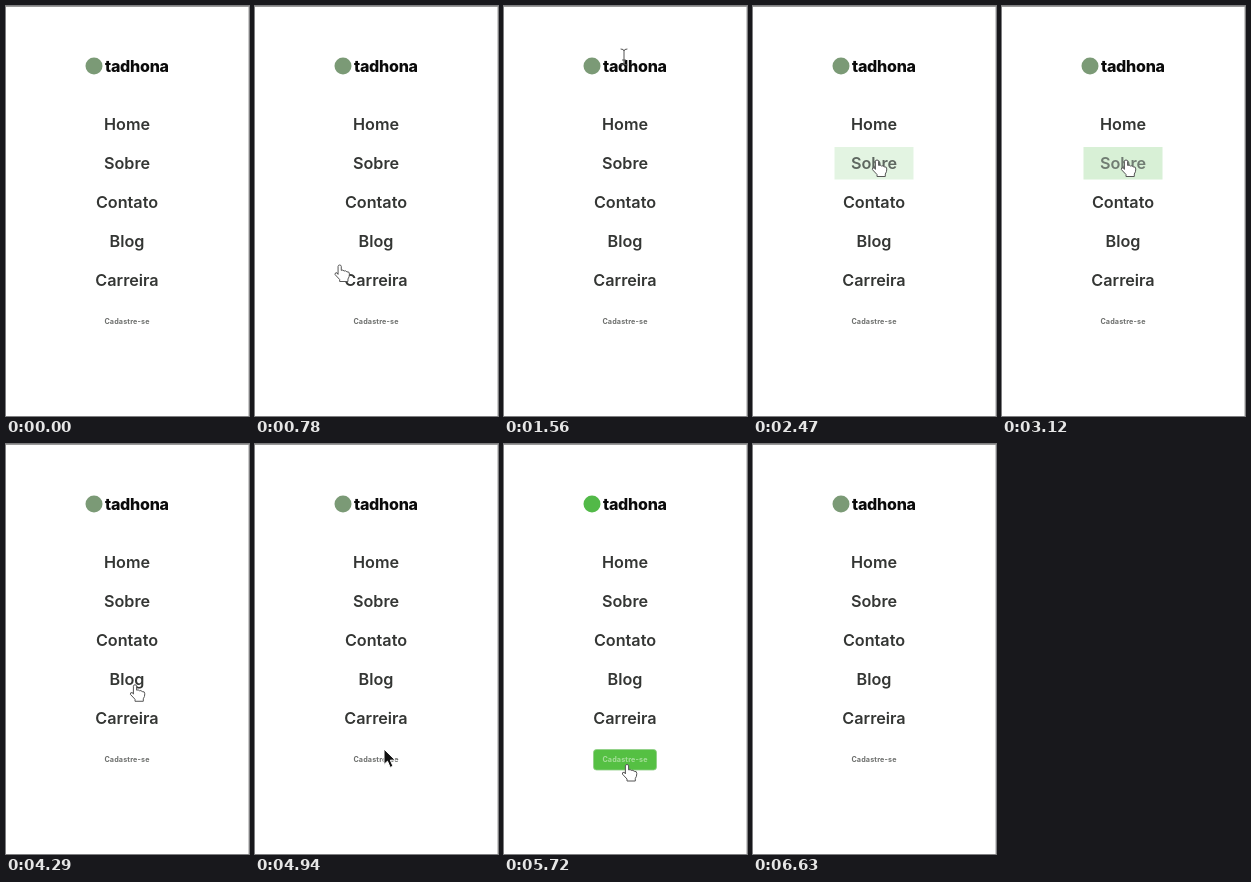
Write an HTML page that moves like this. It is 243 by 410 pixels and loops after 6.89 s.

```html
<!DOCTYPE html>
<html lang="pt">
<head>
<meta charset="utf-8">
<title>Menu</title>
<style>
  html, body { margin: 0; width: 100%; height: 100%; overflow: hidden; background: #fff; }
  svg { display: block; width: 243px; height: 410px; font-family: Inter, "Open Sans", sans-serif; }
  .soft { filter: blur(.35px); }
  .brand { font-size: 16px; font-weight: 800; letter-spacing: -.25px; fill: #0b0b0b; }
  .links { font-size: 16.2px; font-weight: 600; text-anchor: middle; fill: #343634; }
  .signup { font-size: 7.2px; font-weight: 700; letter-spacing: .15px; text-anchor: middle; }
</style>
</head>
<body>
<svg viewBox="0 0 243 410">
  <rect width="243" height="410" fill="#fff"/>
  <path d="M242.5 0V410" stroke="#ccc"/>
  <path d="M0 .5H243" stroke="#999"/>
  <g class="soft">
    <circle id="logo" cx="88" cy="60" r="8.5"/>
    <text class="brand" x="99" y="66">tadhona</text>
    <rect id="hover" x="81.5" y="141" width="79" height="32.5" fill="#d8f0d6"/>
    <g id="links" class="links"></g>
    <rect id="button" x="89.5" y="305.5" width="63" height="20.5" rx="3" fill="#55c043" stroke="#8fcf84" stroke-width=".8"/>
    <text id="signup" class="signup" x="121" y="318">Cadastre-se</text>
    <g id="cursor" stroke-linejoin="round" stroke-linecap="round">
      <path id="arrow" d="M0 0V15L3.5 11.8L6.2 18L9 16.8L6.3 10.8H11Z" fill="#111" stroke="#fff"/>
      <path id="beam" d="M-3 -8Q0 -8 0 -6Q0 -8 3 -8M0 -6V6M-3 8Q0 8 0 6Q0 8 3 8M-1.5 3H1.5" fill="none" stroke="#555"/>
      <path id="hand" d="M-1.6 9V1.4Q-1.5 0 0 0T1.6 1.4V5.4Q3.2 4.5 4.5 6Q6 5.2 7.2 6.8Q9.8 6.3 9.8 9Q9.8 12 8.3 14V16.5H0V14.5L-4.6 9.6Q-5 7.4 -3 7.7Z" fill="#fff" stroke="#555"/>
    </g>
  </g>
</svg>
<script>
const LOOP = 6890, STEP = 130, ENTER = 520;
const FIRST = 118, GAP = 39; // link centres
const $ = id => document.getElementById(id);

const links = ["Home", "Sobre", "Contato", "Blog", "Carreira"].map((label, i) => {
  const el = document.createElementNS("http://www.w3.org/2000/svg", "text");
  el.textContent = label;
  el.setAttribute("x", 121);
  el.setAttribute("y", FIRST + 6 + GAP * i);
  $("links").append(el);
  return el;
});

const moves = [
  { from: ENTER, to: 1300, x: 120, y: 51 },   // up to the brand
  { from: 1560, to: 2470, x: 124, y: 154 },   // Sobre
  { from: 3380, to: 3900, x: 129, y: 202 },   // Contato
  { from: 3900, to: 4940, x: 129, y: 305.4 }, // above the button
  { from: 4940, to: 5720, x: 123, y: 320.5 }, // onto the button
  { from: 5720, to: 6500, x: 82, y: 412 }     // out at the bottom
];

const ramp = (t, from, to) => Math.min(1, Math.max(0, (t - from) / (to - from)));
const easeOut = k => Math.sin(k * Math.PI / 2);
const fade = (t, inAt, inEnd, outAt, outEnd) =>
  easeOut(ramp(t, inAt, inEnd)) * (1 - ramp(t, outAt, outEnd));
const mix = (a, b, k) => `rgb(${a.map((v, i) => Math.round(v + (b[i] - v) * k))})`;

function pointer(t) {
  let x = 67, y = 363;
  for (const m of moves) {
    const k = ramp(t, m.from, m.to);
    x += (m.x - x) * k;
    y += (m.y - y) * k;
  }
  return [x, y];
}

function shapeAt(x, y) {
  if (y < 75) return "beam";
  const row = Math.round((y - FIRST) / GAP);
  const onLink = row >= 0 && row < links.length && Math.abs(y - FIRST - GAP * row) < 16.5;
  const onButton = y > 306 && y < 326;
  return x > 82 && (onLink || onButton) ? "hand" : "arrow";
}

function draw(t) {
  const hover = fade(t, 2210, 2730, 3900, 4160);
  $("hover").setAttribute("opacity", hover);
  links[1].style.fill = mix([52, 54, 52], [112, 124, 114], hover);

  const press = fade(t, 4940, 5460, 5850, 6370);
  $("button").setAttribute("opacity", press);
  $("signup").style.fill = mix([108, 110, 108], [166, 222, 154], press);
  $("logo").style.fill = mix([123, 154, 118], [82, 185, 72], press);

  const [x, y] = pointer(t);
  const shape = t < ENTER ? "" : shapeAt(x, y);
  for (const id of ["arrow", "beam", "hand"])
    $(id).style.display = id === shape ? "" : "none";
  $("cursor").setAttribute("transform", `translate(${x} ${y})`);
}

const start = performance.now();
function tick() {
  const t = (performance.now() - start) % LOOP;
  draw(Math.floor(t / STEP) * STEP);
  requestAnimationFrame(tick);
}
tick();
</script>
</body>
</html>
```
